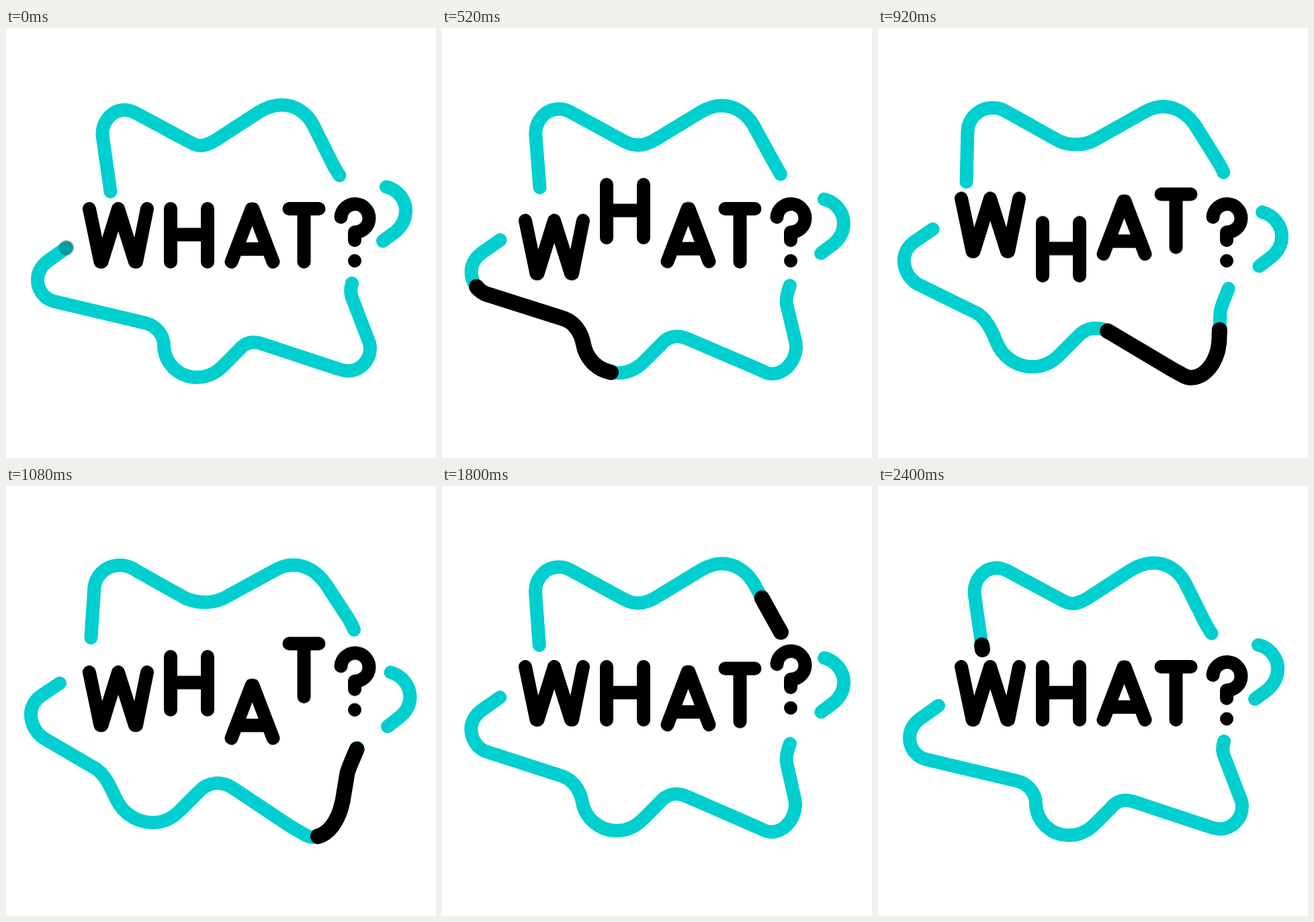
An HTML page for the animation above (2.44 s loop, 640x640 px).

```html
<!DOCTYPE html>
<html lang="en">
<head>
<meta charset="utf-8">
<title>What?</title>
<style>
  @property --head { syntax: "<number>"; inherits: false; initial-value: 0; }
  @property --tail { syntax: "<number>"; inherits: false; initial-value: 0; }

  :root {
    --loop: 2440ms;
    --smooth: cubic-bezier(.333, 0, .667, 1);
  }
  html, body { margin: 0; width: 100%; height: 100%; overflow: hidden; background: #fff; }
  svg { display: block; width: 100%; height: 100%; }
  path { fill: none; stroke-linecap: round; stroke-linejoin: round; }

  /* Outline: three open strokes that bend to a second pose and back */
  .line { stroke: #00cfcf; stroke-width: 20; }
  .bottom {
    --morph: bend-bottom; --ease: cubic-bezier(.333, 0, .667, .667);
    d: path("M90 327 L62 347 C53 354 47 364 47 375 C47 389 56 403 72 407 L207 439 C223 443 235 456 235 473 C236 499 257 520 284 520 C299 520 313 513 323 503 L346 480 C355 468 367 465 381 470 L493 507 L500 509 C503 510 506 510.5 509 510.5 C527 510.5 542 495 542 477 C542 473 541 468 539 464 L516 404 C512 395 513 386 515 380");
  }
  .side {
    --morph: bend-side; --ease: var(--smooth);
    d: path("M561 317 L580 303 C589 295 595 285 595 272 C595 255 582 240 566 236.5");
  }
  .top {
    --morph: bend-top; --ease: cubic-bezier(.333, 0, .667, .667);
    d: path("M496.5 219.5 C493 215 490 209 487 204 L457 144 C448 127 431 114.5 411 114.5 C398 114.5 386 119 375 126 L312 167 C305 171 297 175 290 175 C284 175 279 173 274 170 L193 126.5 C188 124 182 122 177 122 C156 122 141 142 144 163 L155.5 243.5");
  }
  .line { animation: var(--morph) var(--loop) var(--ease) infinite; }

  @keyframes bend-bottom {
    45.902% {
      animation-timing-function: cubic-bezier(.333, .333, .667, 1);
      d: path("M79.6 292.2 L53.7 309.6 C42.6 316.6 36.6 327.7 36.6 338.7 C36.6 353.7 45.6 367.7 56.4 374.8 L131.2 420.3 C144.1 428.5 152 446.7 161.3 465.7 C171.6 486.5 192.6 500.3 216.5 500.3 C231.5 500.3 244.5 494.3 255.5 483.3 L284.8 454 C297.9 439.9 317.2 437 335.3 448.2 L421.4 507 L440.8 518.3 C444.9 520.9 450 523 454 523 C473 523 488 506.4 496.3 481.2 C497.4 477.2 498.4 473.2 499.6 469.2 L507.7 427.9 C509.9 419.9 518.2 402.6 523.3 389.9");
    }
  }
  @keyframes bend-side {
    45.902% {
      d: path("M568 358 L586 344 C596 336 601.5 326 601.5 314 C601.5 297 589 282 572.5 277.5");
    }
  }
  @keyframes bend-top {
    45.902% {
      animation-timing-function: cubic-bezier(.333, .333, .667, 1);
      d: path("M518.8 213.8 C516.9 207.7 513.9 202.8 510.9 197.8 L476.7 146.1 C464.6 129.1 447.6 117.6 427.6 117.6 C418.8 117.6 410.9 120 402 125 L324.5 167 C316.4 171 306.3 172.9 296.2 172.9 C285 172.9 275.9 170.9 266.7 166.9 L194 126 C187 120.9 178.9 117.8 169.7 117.8 C146.7 117.8 130.6 134.7 130.5 156.8 L125.4 225.3");
    }
  }

  /* Black dash running along the outline, as percent of each stroke */
  .dash {
    stroke: #000; stroke-width: 23;
    stroke-dasharray: calc((var(--head) - var(--tail)) * 1px) 300px;
    stroke-dashoffset: calc(var(--tail) * -1px);
    opacity: calc((var(--head) - var(--tail)) * 1000);
    animation:
      var(--morph) var(--loop) var(--ease) infinite,
      var(--run) var(--loop) var(--smooth) infinite,
      var(--chase) var(--loop) var(--smooth) infinite;
  }
  .dash.bottom { --run: head-bottom; --chase: tail-bottom; }
  .dash.side { --run: head-side; --chase: tail-side; }
  .dash.top { --run: head-top; --chase: tail-top; }

  @keyframes head-bottom { 0% { --head: 0; } 45.902%, 100% { --head: 100; } }
  @keyframes tail-bottom { 0%, 11.475% { --tail: 0; } 57.377%, 100% { --tail: 100; } }
  @keyframes head-side { 0%, 54.51% { --head: 0; } 69.26%, 100% { --head: 100; } }
  @keyframes tail-side { 0%, 58.2% { --tail: 0; } 72.95%, 100% { --tail: 100; } }
  @keyframes head-top { 0%, 68.85% { --head: 0; } 93.44%, 100% { --head: 100; } }
  @keyframes tail-top { 0%, 75.41% { --tail: 0; } 100% { --tail: 100; } }

  /* Letters hop one after another */
  .word path {
    stroke: #000; stroke-width: 20;
    animation: hop var(--loop) var(--smooth) var(--wait, 0ms) infinite;
  }
  @keyframes hop {
    0%, 59.43%, 100% { transform: translateY(0); }
    11.89% { transform: translateY(-36.5px); }
    24.59% { transform: translateY(28px); }
    35.66% { transform: translateY(-18px); }
    47.54% { transform: translateY(14px); }
  }
</style>
</head>
<body>
<svg viewBox="0 0 640 640" role="img" aria-label="WHAT?">
  <path class="line bottom"/>
  <path class="line side"/>
  <path class="line top"/>
  <path class="dash bottom" pathLength="100"/>
  <path class="dash side" pathLength="100"/>
  <path class="dash top" pathLength="100"/>
  <g class="word">
    <path d="M124 269 L140.5 348 M142.5 348 L167 269 L192 348 M194 348 L210 269"/>
    <path style="--wait: 253ms" d="M245 269 V348 M300 269 V348 M245 307.5 H300"/>
    <path style="--wait: 500ms" d="M335.5 348 L365.5 269.5 H367.5 L397.5 348 M345 329 H388"/>
    <path style="--wait: 758ms" d="M421.5 269 H465.5 M443.5 269 V348"/>
    <path style="--wait: 962ms" d="M498.5 281.5 A21 21 0 1 1 519 304 V316 M519 346.5 h.01"/>
  </g>
</svg>
</body>
</html>
```
